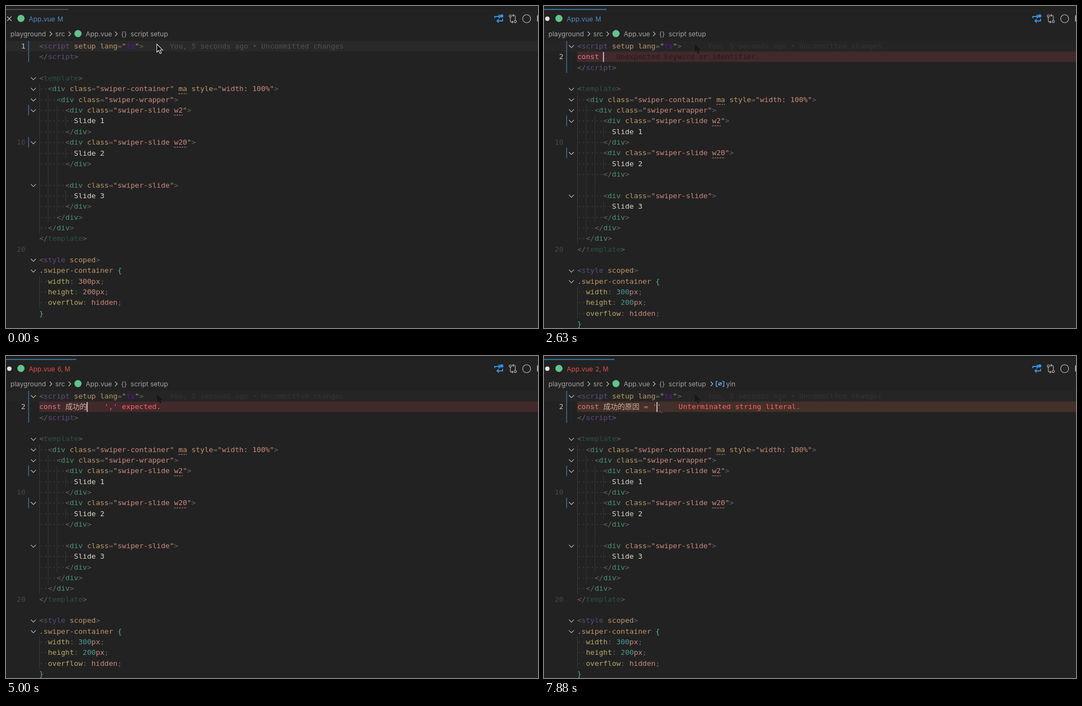
Write an HTML page that moves like this. It is 961 px wide and 583 px high and loops after 8000 ms.

```html
<!DOCTYPE html>
<html lang="en">
<head>
<meta charset="utf-8">
<title>Editor typing</title>
<style>
html, body { margin: 0; width: 100%; height: 100%; overflow: hidden; background: #222; }
#stage { position: relative; width: 961px; height: 583px; overflow: hidden; }
svg { position: absolute; left: 0; top: 0; }
text { white-space: pre; }
.code text { font: 13.05px "DejaVu Sans Mono", "Noto Sans CJK SC", "Noto Sans CJK", monospace; }
.ui text { font: 12.1px Inter, sans-serif; fill: #a2a2a2; }
.line { fill: none; stroke: #b8b8b8; stroke-width: 1.1; }
.p, .P { fill: #666; }
.x { fill: #5f4a82; }
.t { fill: #2b503f; }
.g, .D { fill: #4d9375; }
.a { fill: #bd976a; }
.s, .u { fill: #c98a7d; }
.z { fill: #5c10b4; }
.w, .m { fill: #dbd7ca; }
.c { fill: #b8a965; }
.n { fill: #4c9a91; }
.b { fill: #5eaab5; }
.k { fill: #dc7b7b; }
.v { fill: #d2ac98; }
.first .n { fill: #c98a7d; }
.broken .P, .broken .D, .broken .n { fill: #dbd7ca; }
.broken .w { fill: #bda58a; }
.broken .m { fill: #4c9a91; }
.broken .c { fill: #98a06a; }
.dots { fill: #424242; }
.dash { stroke: #c98a7d; stroke-dasharray: 3 1.6; }
.wave { fill: none; stroke: #d9605a; }
.bar { fill: #3c6a8a; }
#popup { position: absolute; display: flex; box-sizing: border-box; width: 384px; height: 27px;
  border-radius: 9px; overflow: hidden; background: #cfcfcf; color: #262626;
  font: 15.5px/27px "Noto Sans CJK SC", "Noto Sans CJK", sans-serif; white-space: nowrap; }
#popup span { padding: 0 8px 0 5px; }
#popup .latin { font: 14.6px/27px Inter, sans-serif; }
#popup i { display: inline-block; width: 11px; font: 9px/27px Inter, sans-serif; color: #777; }
#popup span:first-child { background: #dc3787; color: #fff; }
#popup span:first-child i { color: #fff; }
#popup svg { left: auto; right: 0; background: #c8c8c8; }
</style>
</head>
<body>
<div id="stage">
  <svg id="view" width="961" height="583"></svg>
  <div id="popup"></div>
</div>
<script>
(() => {
const LOOP = 8000, X0 = 60, COL = 7.857, CJK = 13.05, ROW = 19.35;
const view = document.getElementById('view'), popup = document.getElementById('popup');

function el(tag, attrs, parent = view, text) {
  const node = document.createElementNS('http://www.w3.org/2000/svg', tag);
  for (const key in attrs) node.setAttribute(key, attrs[key]);
  if (text !== undefined) node.textContent = text;
  return parent.appendChild(node);
}
const show = (node, on) => { node.style.display = on ? '' : 'none'; };
const base = row => 77 + (row - 1) * ROW;
const rowTop = row => base(row) - 14;
const width = s => [...s].reduce((w, ch) => w + (ch > '\u2e80' ? CJK : COL), 0);
const plain = line => line.split('|').map(t => t.slice(1)).join('');

// A line is a list of tokens split by "|"; the first letter of each is its class.
function tokens(line, x, y, parent) {
  const text = el('text', { x, y }, parent);
  for (const t of line.split('|')) el('tspan', { class: t[0] }, text, t.slice(1));
}
const chevron = (row, parent) =>
  el('path', { class: 'line', d: `M45 ${base(row) - 6}l4.5 4.5l4.5-4.5` }, parent);
const wave = (x, w, y, parent) =>
  el('path', { class: 'wave', d: `M${x} ${y}` + 'q1.5-3 3 0t3 0'.repeat(Math.round(w / 6)) }, parent);

const slide = extra => `p<|gdiv |aclass|p=|s"swiper-slide${extra}"|p>`;
const close = 'P</|Ddiv|P>';
const css = (name, value) => `c${name}|p: |${value}|p;`;
const rows = [ // indent, line, foldable
  [0, 'p</|xscript|p>'],
  [0, ''],
  [0, 'p<|ttemplate|p>', 1],
  [2, 'p<|gdiv |aclass|p=|s"swiper-container" |ama style|p=|s"width: 100%"|p>', 1],
  [4, 'p<|gdiv |aclass|p=|s"swiper-wrapper"|p>', 1],
  [6, slide(' w2'), 1],
  [8, 'wSlide |m1'],
  [6, close],
  [6, slide(' w20'), 1],
  [8, 'wSlide |m2'],
  [6, close],
  [6, ''],
  [6, slide(''), 1],
  [8, 'wSlide |m3'],
  [6, close],
  [4, close],
  [2, close],
  [0, 'P</|ttemplate|P>'],
  [0, ''],
  [0, 'p<|xstyle |ascoped|p>', 1],
  [0, 'a.swiper-container |b{', 1],
  [2, css('width', 'n300|upx')],
  [2, css('height', 'n200|upx')],
  [2, css('overflow', 'shidden')],
  [0, 'b}']
];

// Tab bar and breadcrumbs
el('rect', { width: 961, height: 6, fill: '#1f1f1f' });
const ui = el('g', { class: 'ui' });
const tabLine = el('rect', { y: 5.5, height: 1.6 }, ui);
const cross = el('path', { class: 'line', d: 'M2 19l8 8m0-8l-8 8' }, ui);
const dirty = el('circle', { cx: 6, cy: 23, r: 4, fill: '#e4e4e4' }, ui);
for (const [cx, cy] of [[27, 22.5], [130, 50]]) el('circle', { cx, cy, r: 6.5, fill: '#62c48c' }, ui);
const tabName = el('text', { x: 41, y: 27.5 }, ui, 'App.vue');
const tabMark = el('text', { x: 93, y: 27.5 }, ui);
tabMark.style.fontSize = '11.3px';
for (const [x, word] of [[8, 'playground'], [89, 'src'], [144, 'App.vue'], [208, '{}'], [225, 'script setup']])
  el('text', { x, y: 55 }, ui, word);
const crumb = (x, parent) => el('path', { class: 'line', d: `M${x} 46.5l4 4l-4 4` }, parent);
[79, 113, 197].forEach(x => crumb(x, ui));
const symbol = el('g', {}, ui);
crumb(301, symbol);
el('path', { d: 'M314 46h-3v9h3M322 46h3v9h-3M315 52.5l6-4', fill: 'none', stroke: '#75beff', 'stroke-width': 1.2 }, symbol);
el('ellipse', { cx: 318, cy: 50.5, rx: 3, ry: 2.5, fill: 'none', stroke: '#75beff' }, symbol);
el('text', { x: 329, y: 55 }, symbol, 'yin');

// Toolbar
el('path', { d: 'M883 22v-3h10m-3-3l3 3l-3 3M897 23v4h-10m3-3l-3 3l3 3', fill: 'none', stroke: '#3b8fd6', 'stroke-width': 1.8 });
el('circle', { cx: 895.5, cy: 18, r: 3, fill: '#2f8ff0' });
el('path', { class: 'line', d: 'M911 20v7q0 2 2 2h3m-2-2l2 2l-2 2M920 26v-7q0-2-2-2h-3m2-2l-2 2l2 2' });
el('circle', { class: 'line', cx: 911, cy: 18, r: 2 });
el('circle', { class: 'line', cx: 920, cy: 28, r: 2 });
el('circle', { class: 'line', cx: 940.5, cy: 23, r: 7.2, 'stroke-width': 1.4 });
el('rect', { x: 959.5, y: 17, width: 1.5, height: 11, fill: '#c5c5c5' });

// Code
const code = el('g', { class: 'code' });
const firstBand = el('rect', { y: 63, width: 961, height: ROW }, code);
const band = el('rect', { x: 60, y: rowTop(2), width: 901, height: 19 }, code);
const topBar = el('rect', { class: 'bar', x: 40, y: 63, width: 1.6 }, code);
const lineNo = (n, fill) => el('text', { x: 35, y: base(n), 'text-anchor': 'end', fill }, code, n);
const current = lineNo(1, '#c6c6c6');
lineNo(10, '#484848');
lineNo(20, '#484848');
const fold = chevron(1, code);
tokens('p<|xscript |asetup lang|p=|s"|zts|s"|p>', X0, base(1), code);
const blame = el('text', { x: 296, y: base(1) }, code, 'You, 5 seconds ago • Uncommitted changes');
const rest = el('g', {}, code);
rows.forEach(([indent, line, folds], i) => {
  const row = i + 2, y = base(row), x = X0 + indent * COL;
  for (let c = 0; c < indent; c += 2)
    el('rect', { x: X0 + c * COL, y: rowTop(row), width: 1, height: ROW, fill: '#373737' }, rest);
  if (!line) return;
  if (indent) el('text', { class: 'dots', x: X0, y }, rest, '·'.repeat(indent));
  tokens(line, x, y, rest);
  if (folds) chevron(row, rest);
  const hit = /\b(ma|w20?)\b(?=[ "])/.exec(plain(line));
  if (hit) {
    const from = x + hit.index * COL;
    el('path', { class: 'dash', d: `M${from} ${y + 4.5}h${hit[0].length * COL}` }, rest);
  }
});
for (const row of [7, 10]) el('rect', { class: 'bar', x: 40, y: rowTop(row), width: 1.6, height: 19 }, rest);

const input = el('g', {}, code);
const bulb = el('g', {});
el('circle', { cx: 66, cy: 71, r: 7, fill: '#262626' }, bulb);
el('circle', { cx: 66, cy: 69, r: 4.7, fill: '#ffcc00' }, bulb);
el('path', { d: 'M64 73h4v3h-4z', fill: '#ffcc00' }, bulb);
const arrow = el('path', { d: 'M272.5 69v14.5l3.3-3l2.5 5.5l2.4-1l-2.4-5.3h4.6z', 'stroke-width': 1.1 });

const RED = '#42292c', BROWN = '#43302a', IDLE = '#292929';
const NAME = 'kconst |v成功', FULL = NAME + '的原因';
const COMMA = "',' expected.", INIT = "'const' declarations must be initialized.";
const UNEXPECTED = 'Unexpected keyword or identifier.';

// Each step changes only the listed properties.
const steps = [
  [0, { open: 0, line: '', mark: '', list: '', tail: '', band: '', msg: '', ghost: 0, errors: 0, squiggle: '',
        bulb: 0, symbol: 0, broken: 0, caret: 1 }],
  [380, { open: 1, band: IDLE }],
  [1000, { mark: 'c', list: '从 才 成 此 错' }],
  [1130, { mark: 'co', list: '从 凑 聪 粗 村' }],
  [1380, { mark: 'con', list: '从 聪 葱 匆 丛' }],
  [1750, { mark: 'con s', list: '从事 cons 从属 从 聪' }],
  [1880, { mark: 'con s t', list: '从身体 constant cons 从事 从' }],
  [2130, { line: 'kconst', mark: '', list: '' }],
  [2250, { band: RED, msg: UNEXPECTED, errors: 1 }],
  [2500, { line: 'kconst ', ghost: 1, errors: 0 }],
  [2750, { band: IDLE, msg: '', ghost: 0 }],
  [3250, { mark: 'c', list: '从 才 成 此 错' }],
  [3380, { mark: 'ch', list: '出 吃 成 从 长' }],
  [3500, { mark: 'che', list: '车 成 扯 彻 撤' }],
  [3630, { mark: 'cheng', list: '成 城 程 称 乘' }],
  [3750, { mark: 'cheng g', list: '成功 成果 成 城 程' }],
  [3880, { mark: 'cheng gong', list: '成功 乘公 成 城 程' }],
  [4000, { line: NAME, mark: '', list: '' }],
  [4380, { msg: COMMA, squiggle: '成功' }],
  [4500, { band: RED, errors: 6 }],
  [4630, { mark: 'd', list: '的 大 都 到 对', squiggle: '' }],
  [4750, { mark: 'de', list: '的 得 地 德 嘚' }],
  [5000, { line: NAME + '的', mark: '', list: '' }],
  [5130, { mark: 'y', list: '一 有 要 也 用' }],
  [5250, { mark: 'yu', list: '与 于 语 雨 鱼' }],
  [5380, { mark: 'yua', list: '元 原 员 远 圆' }],
  [5500, { mark: 'yuan', list: '元 原 员 远 圆' }],
  [5630, { mark: 'yuan y', list: '原因 愿意 元 原 员' }],
  [5880, { mark: 'yuan yi', list: '愿意 原意 原 远 元', bulb: 1, symbol: 1 }],
  [6000, { mark: 'yuan yin', list: '原因 援引 原音 元音 缘因 远因', caret: 0 }],
  [6380, { line: FULL, mark: '', list: '', caret: 1 }],
  [6500, { bulb: 0 }],
  [6750, { line: FULL + ' ', msg: INIT, squiggle: '成功的原因' }],
  [6880, { line: FULL + ' |k=' }],
  [7000, { line: FULL + ' |k= ' }],
  [7130, { line: FULL + ' |k= |s‘', broken: 1 }],
  [7500, { line: FULL + ' |k= ' }],
  [7630, { line: FULL + " |k= |s'", tail: "s'", msg: '', squiggle: '', broken: 0 }],
  [7750, { msg: 'Unterminated string literal.', band: BROWN, squiggle: "'", errors: 2 }]
];

function drawInput(s) {
  input.replaceChildren();
  if (!s.open) return;
  const y = base(2), text = plain(s.line), from = X0 + width(text), at = from + width(s.mark);
  if (s.line) tokens(s.line, X0, y, input);
  if (s.tail) tokens(s.tail, at, y, input);
  if (s.mark) {
    el('text', { class: 'w', x: from, y }, input, s.mark);
    el('path', { d: `M${from} ${y + 3.5}H${at}`, stroke: '#d07f8c' }, input);
  }
  if (s.msg) {
    const end = s.ghost ? X0 + width(text.trim()) : at + (s.tail ? COL : 0);
    el('text', { x: end + 4 * COL, y, fill: s.ghost ? '#281a1c' : '#ff6161' }, input, s.msg);
  }
  if (s.squiggle) {
    const x = s.tail ? at + 4 : X0 + 6 * COL;
    wave(x, width(s.squiggle), y + 5, input);
  }
  if (s.caret) el('rect', { x: at - .5, y: y - 13, width: 1.6, height: 18, fill: '#d8d8d8' }, input);
}

function drawPopup(s) {
  show(popup, s.list);
  if (!s.list) return;
  const text = plain(s.line);
  popup.style.left = X0 + width(text) - 15.5 + 'px';
  popup.style.top = (text ? 104.8 : 105.8) + 'px';
  popup.replaceChildren();
  s.list.split(' ').forEach((word, i) => {
    const cell = document.createElement('span'), index = document.createElement('i');
    index.textContent = i + 1;
    if (word < '\u2e80') cell.className = 'latin';
    cell.append(index, word);
    popup.append(cell);
  });
  const more = el('svg', { width: 27, height: 27 }, popup);
  el('path', { d: 'M9.5 11.5l4 4l4-4', fill: 'none', stroke: '#555', 'stroke-width': 1.3 }, more);
}

function draw(s) {
  const tabColour = s.errors ? '#dc4f4b' : '#4d8cb8';
  tabLine.setAttribute('width', s.errors ? 127 : 113);
  tabLine.setAttribute('fill', s.open ? '#3583b4' : '#555');
  tabName.style.fill = tabMark.style.fill = tabColour;
  tabMark.textContent = (s.errors ? s.errors + ', ' : '') + 'M';
  show(cross, !s.open);
  show(dirty, s.open);
  show(symbol, s.symbol);
  show(fold, s.open);
  show(bulb, s.bulb);
  show(band, s.band);
  band.setAttribute('fill', s.band || 'none');
  firstBand.setAttribute('fill', s.open ? '#252525' : '#292929');
  topBar.setAttribute('height', s.open ? 58 : 38.5);
  current.textContent = s.open ? 2 : 1;
  current.setAttribute('y', base(s.open ? 2 : 1));
  rest.setAttribute('transform', `translate(0 ${s.open ? ROW : 0})`);
  blame.setAttribute('fill', s.open ? '#333' : '#505050');
  arrow.setAttribute('fill', s.open ? '#171717' : '#000');
  arrow.setAttribute('stroke', s.open ? 'none' : '#e8e8e8');
  code.setAttribute('class', 'code' + (s.open ? '' : ' first') + (s.broken ? ' broken' : ''));
  drawInput(s);
  drawPopup(s);
}

let shown = -1;
const start = performance.now();
function tick() {
  const t = (performance.now() - start) % LOOP;
  const count = steps.filter(([at]) => at <= t).length;
  if (count !== shown) {
    shown = count;
    draw(Object.assign({}, ...steps.slice(0, count).map(step => step[1])));
  }
  requestAnimationFrame(tick);
}
tick();
})();
</script>
</body>
</html>
```
